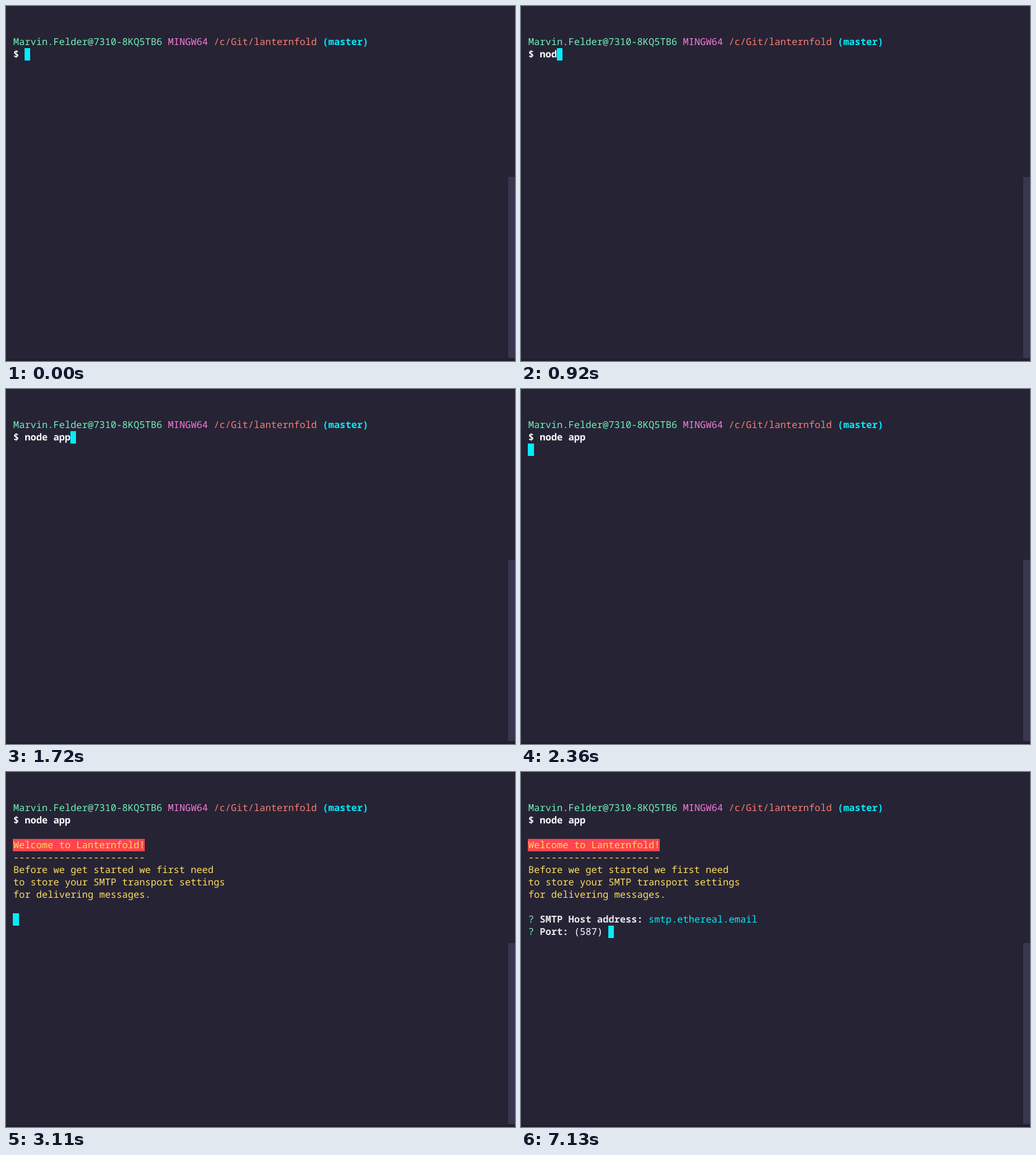
Recreate the animation shown at these times as an HTML page with a canvas. Size 822 px wide and 573 px high, loop 8000 ms.

```html
<!DOCTYPE html>
<html lang="en">
<head>
<meta charset="utf-8">
<title>Terminal setup</title>
<style>
  html, body { margin: 0; width: 100%; height: 100%; overflow: hidden; background: #262335; }
  canvas { display: block; width: 822px; height: 573px; }
</style>
</head>
<body>
<canvas id="screen"></canvas>
<script>
const W = 822, H = 573, LOOP = 8000;
const LEFT = 11.8, TOP = 48, COL = 9.25, ROW = 20, BASE = 15;
const SIZE = COL / 0.6;
const C = {
  bg: '#262335', green: '#72f1b8', pink: '#f67bd6', salmon: '#f97e72',
  cyan: '#03edf9', red: '#fe4450', yellow: '#fede5d', white: '#ffffff', soft: '#e8e8ea'
};

const COMMAND = 'node app';
const KEYS = [680, 760, 920, 1120, 1235, 1350, 1560, 1720];
const ENTER = 2360, BLANK = 3080, WELCOME = 3110, ASK_HOST = 3130, ASK_PORT = 7130;

const canvas = document.getElementById('screen');
const ctx = canvas.getContext('2d');
const dpr = window.devicePixelRatio || 1;
canvas.width = W * dpr;
canvas.height = H * dpr;
ctx.scale(dpr, dpr);
ctx.textRendering = 'geometricPrecision';

const colX = col => LEFT + col * COL;
const rowY = row => TOP + row * ROW;

function box(x, y, w, h, color) {
  ctx.fillStyle = color;
  ctx.fillRect(x, y, w, h);
}

// Fills whole character cells, snapped to pixels.
function cells(col, row, count, color) {
  const x = Math.floor(colX(col));
  box(x, rowY(row), Math.floor(colX(col + count)) - x, ROW, color);
}

const cursor = (col, row) => cells(col, row, 1, C.cyan);

// Writes a run of text and returns the column after it.
function write(col, row, text, color, weight = 500) {
  ctx.font = `${weight} ${SIZE}px "Noto Sans Mono", "DejaVu Sans Mono", monospace`;
  ctx.fillStyle = color;
  ctx.fillText(text, colX(col), rowY(row) + BASE);
  return col + text.length;
}

function writeRuns(row, runs) {
  return runs.reduce((col, run) => write(col, row, ...run), 0);
}

function drawWindow() {
  box(0, 0, W, H, C.bg);
  box(811, 276, 11, 292, '#3c354f');
  box(0, 570, W, 3, '#201d2d');
}

function drawPrompt() {
  writeRuns(0, [
    ['Marvin.Felder@7310-8KQ5TB6 ', C.green],
    ['MINGW64 ', C.pink],
    ['/c/Git/lanternfold ', C.salmon],
    ['(master)', C.cyan, 600]
  ]);
  write(0, 1, '$', C.white, 600);
}

function drawWelcome() {
  const title = 'Welcome to Lanternfold!';
  cells(0, 3, title.length, C.red);
  [
    title,
    '-'.repeat(title.length),
    'Before we get started we first need',
    'to store your SMTP transport settings',
    'for delivering messages.'
  ].forEach((line, i) => write(0, 3 + i, line, C.yellow));
}

function question(row, label, value, color) {
  return writeRuns(row, [['? ', C.green], [label + ' ', C.soft, 700], [value + ' ', color]]);
}

function draw(t) {
  drawWindow();
  drawPrompt();

  const typed = KEYS.filter(k => t >= k).length;
  const end = write(2, 1, COMMAND.slice(0, typed), C.white, 600);
  if (t < ENTER) return cursor(end, 1);
  if (t < BLANK) return cursor(0, 2);
  if (t < WELCOME) return cursor(0, 3);

  drawWelcome();
  if (t < ASK_HOST) return cursor(0, 9);

  const label = 'SMTP Host address:', host = 'smtp.ethereal.email';
  if (t < ASK_PORT) return cursor(question(9, label, `(${host})`, C.white), 9);

  question(9, label, host, C.cyan);
  cursor(question(10, 'Port:', '(587)', C.white), 10);
}

const start = performance.now();
function tick() {
  draw((performance.now() - start) % LOOP);
  requestAnimationFrame(tick);
}
tick();
</script>
</body>
</html>
```
